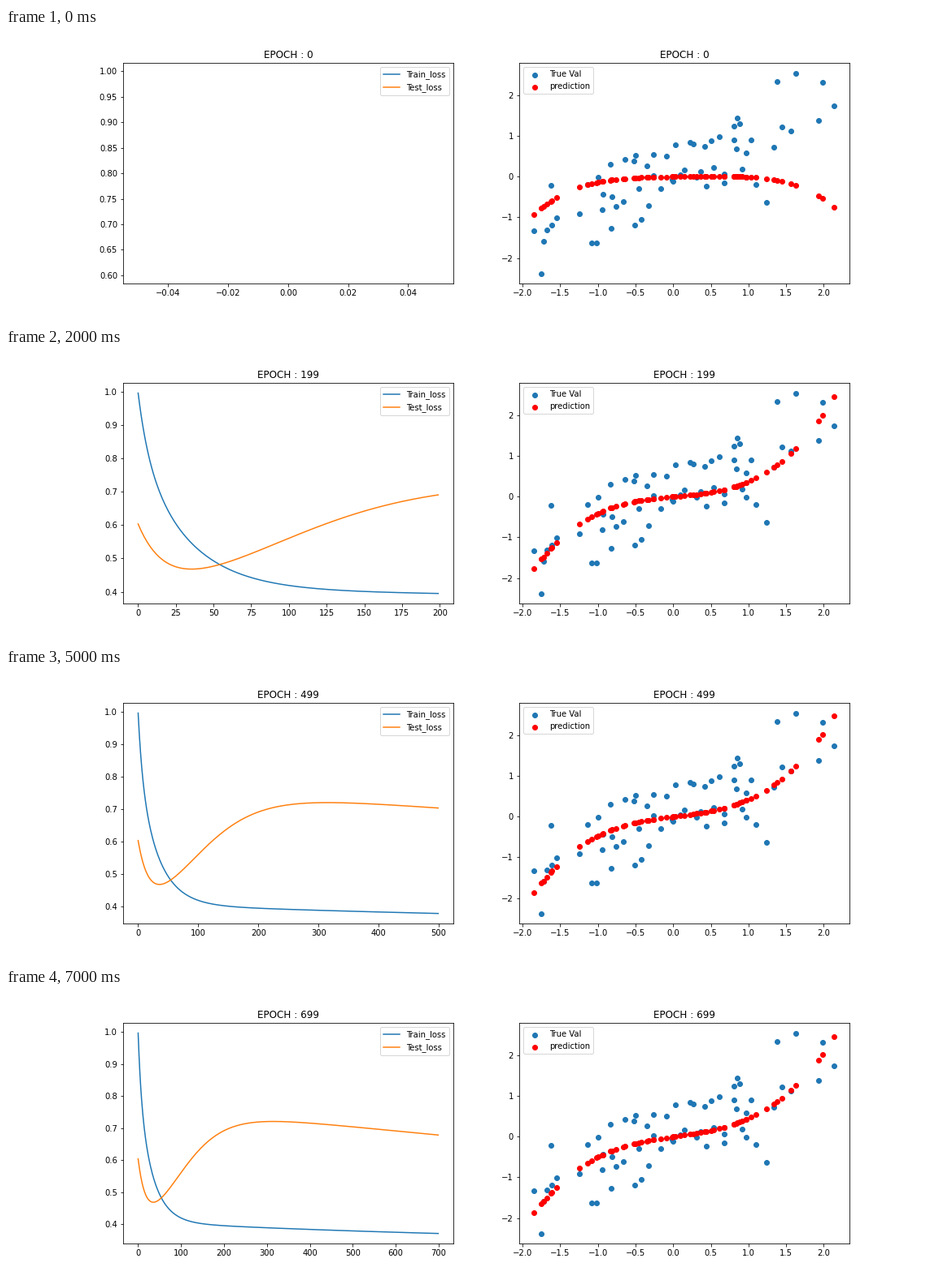
Write a matplotlib script that moves like this. It is 1152x360 px and loops after 8000 ms.

```python
import numpy as np
import matplotlib.pyplot as plt
from matplotlib.animation import FuncAnimation

plt.rcParams["font.family"] = "DejaVu Sans"

STEP = 100      # epochs between two pictures
FRAMES = 8

# samples that stand apart from the middle of the cloud
OUTER = np.array([
    (-1.845, -1.33), (-1.75, -2.38), (-1.725, -1.59), (-1.68, -1.31),
    (-1.61, -1.19), (-1.625, -.21), (-1.55, -1.01), (-1.08, -1.63),
    (-1.02, -1.63), (-.82, -1.27), (-.505, -1.19), (-.42, -1.05),
    (-.83, .30), (-.495, .52), (.81, 1.24), (.855, 1.44), (.885, 1.30),
    (1.10, -.19), (1.235, -.63), (1.34, .72), (1.385, 2.35),
    (1.445, 1.22), (1.565, 1.12), (1.63, 2.55), (1.93, 1.38),
    (1.98, 2.33), (2.14, 1.74),
])


def middle_cloud(n, seed=4):
    """Samples around a rising line, denser near the centre."""
    rng = np.random.default_rng(seed)
    u = np.linspace(-1, 1, n)
    x = .06 + u - .14 * u ** 2 + .14 * u ** 3 + rng.normal(0, .03, n)
    return x, .1 + .5 * x + rng.uniform(-.7, .7, n)


X, Y = np.hstack([OUTER.T, middle_cloud(39)])


def decay(t, tau):
    return np.exp(-t / tau)


def train_loss(t):
    return (.3342 + .073 * decay(t, 1000)
            + .4245 * decay(t, 32) + .165 * decay(t, 7))


def test_loss(t):
    """Quick drop, then overfitting rises to a slowly falling plateau."""
    plateau = .769 - .00013 * t
    rise = .478 / (1 + np.exp((t - 79.3) / 57))
    return plateau - rise + .2173 * decay(t, 18)


def predict(x, t):
    """Quartic through the origin whose weights settle during training."""
    w1 = .03 + .115 * (1 - decay(t, 90)) + .00018 * t
    w2 = -.02 - .00001 * t
    w3 = .0345 + .205 * (1 - decay(t, 60)) - .00005 * t
    w4 = -.051 * (1 - t / 45) * decay(t, 42)
    return x * (w1 + x * (w2 + x * (w3 + x * w4)))


fig, (loss_ax, fit_ax) = plt.subplots(1, 2, figsize=(16, 5), dpi=72)
fig.subplots_adjust(left=.125, right=.9, bottom=.125, top=.88, wspace=.2)


def draw(i):
    epoch = max(0, i * STEP - 1)
    t = np.arange(epoch + 1.0)

    loss_ax.clear()
    loss_ax.plot(t, train_loss(t), label="Train_loss")
    loss_ax.plot(t, test_loss(t), label="Test_loss")
    loss_ax.legend(loc="upper right")

    fit_ax.clear()
    fit_ax.scatter(X, Y, label="True Val")
    fit_ax.scatter(X, predict(X, epoch), color="red", label="prediction")
    fit_ax.legend(loc="upper left")

    for ax in (loss_ax, fit_ax):
        ax.set_title(f"EPOCH : {epoch}")
    return []


anim = FuncAnimation(fig, draw, frames=FRAMES, interval=1000,
                     init_func=lambda: draw(0), repeat=True, repeat_delay=0)
plt.show()
```
